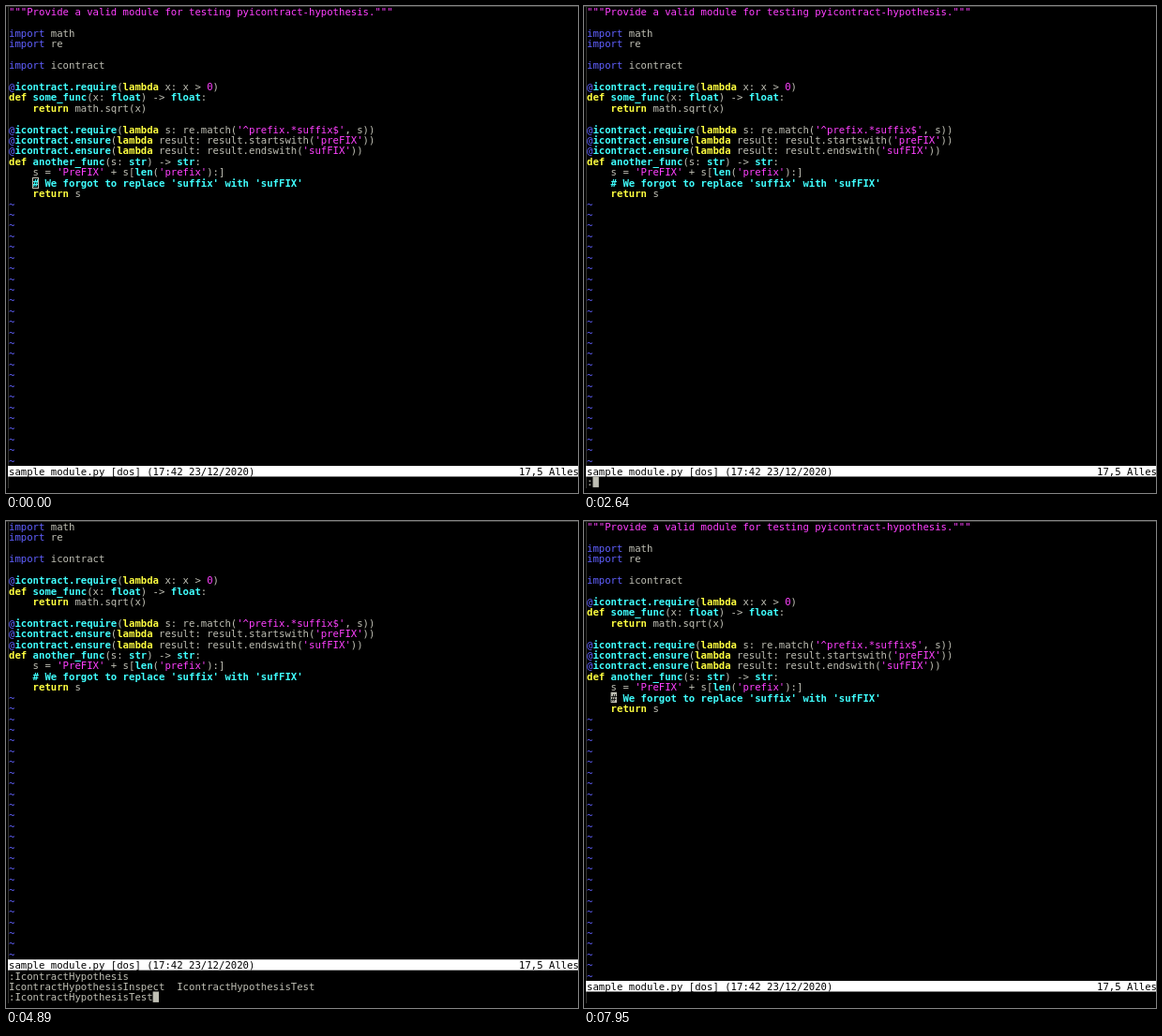
Animation, 610 px wide and 520 px high, one loop 8 s. Source, as an HTML page with a canvas:

```html
<!DOCTYPE html>
<html lang="de">
<head>
<meta charset="utf-8">
<title>Terminal</title>
<style>
html, body { margin: 0; width: 100%; height: 100%; overflow: hidden; background: #000; }
canvas { display: block; }
</style>
</head>
<body>
<canvas id="stage" width="610" height="520"></canvas>
<script>
const ctx = document.getElementById('stage').getContext('2d');
const LOOP = 8000, COLS = 95, ROWS = 45;
const LEFT = 3, CELL_W = 6.4, CELL_H = 11.42, BASE = 10;
const FONT = '10.63px "DejaVu Sans Mono", monospace';
const FG = '#bfbfb4', YELLOW = '#ffff40', CYAN = '#40ffff', BLUE = '#6060ff',
      PINK = '#ff40ff', GREEN = '#40ff40', WHITE = '#ffffff';
const BOLD = new Set([YELLOW, CYAN, GREEN]);

const CODE = `"""Provide a valid module for testing pyicontract-hypothesis."""

import math
import re

import icontract

@icontract.require(lambda x: x > 0)
def some_func(x: float) -> float:
    return math.sqrt(x)

@icontract.require(lambda s: re.match('^prefix.*suffix$', s))
@icontract.ensure(lambda result: result.startswith('preFIX'))
@icontract.ensure(lambda result: result.endswith('sufFIX'))
def another_func(s: str) -> str:
    s = 'PreFIX' + s[len('prefix'):]
    # We forgot to replace 'suffix' with 'sufFIX'
    return s`.split('\n');

const RULES = [
  [PINK, /"""[^"]*"""|'[^']*'|\b0\b/],
  [CYAN, /#.*|(?<=@)[\w.]+|(?<=def )\w+|\b(?:float|str|len)\b/],
  [YELLOW, /\b(?:lambda|def|return)\b/],
  [BLUE, /\bimport\b|@/]
];
const TOKEN = new RegExp(RULES.map(([, re]) => `(${re.source})`).join('|'), 'g');

// A line is a list of [text, colour, column] runs.
const plain = (text, color = FG) => [[text, color, 0]];

function highlight(text) {
  const runs = [];
  let pos = 0;
  for (const m of text.matchAll(TOKEN)) {
    runs.push([text.slice(pos, m.index), FG, pos]);
    const rule = m.slice(1).findIndex(group => group !== undefined);
    runs.push([m[0], RULES[rule][0], m.index]);
    pos = m.index + m[0].length;
  }
  runs.push([text.slice(pos), FG, pos]);
  return runs;
}

const STATUS = 'sample_module.py [dos] (17:42 23/12/2020)'.padEnd(85) + '17,5 Alles';
const EDITOR = CODE.map(highlight);
while (EDITOR.length < 43) EDITOR.push(plain('~', BLUE));
EDITOR.push(plain(STATUS, '#000'));

const HOME = 'belk\\workspace\\tobelka\\icontract-hypothesis';
const PKG = 'icontract_hypothesis\\pyicontract_hypothesis\\';
const LIB = 'venv\\lib\\site-packages\\';
const call = (path, line, name, code, users = 'users') => [
  `  File "C:\\${users}\\${HOME}\\${path}", line ${line}, in ${name}`,
  '    ' + code
];
const execute = call(PKG + '_test.py', 228, 'execute', 'func(**kwargs)');

const OUTPUT = [
  'Falsifying example: execute(',
  "    kwargs={'s': 'prefixsuffix'},",
  ')',
  'Traceback (most recent call last):',
  ...call('venv\\Scripts\\pyicontract-hypothesis-script.py', 11, '<module>',
    "load_entry_point('icontract-hypothesis', 'console_scripts', 'pyicontract-hypothesis')()", 'Users'),
  ...call(PKG + 'main.py', 283, 'entry_point',
    'return run(argv=sys.argv[1:], stdout=sys.stdout, stderr=sys.stderr)'),
  ...call(PKG + 'main.py', 258, 'run', 'errors = _test.test('),
  ...call(PKG + '_test.py', 341, 'test', 'test_errors = _test_function_point('),
  ...call(PKG + '_test.py', 234, '_test_function_point', 'wrapped()'),
  ...execute,
  ...call(LIB + 'hypothesis\\core.py', 1164, 'wrapped_test', 'raise the_error_hypothesis_found'),
  ...execute,
  ...call(LIB + 'icontract\\_checkers.py', 461, 'wrapper',
    '_assert_postcondition(contract=contract, resolved_kwargs=resolved_kwargs)'),
  ...call(LIB + 'icontract\\_checkers.py', 314, '_assert_postcondition', 'raise ViolationError(msg)'),
  `icontract.errors.ViolationError: File C:\\Users\\${HOME}-vim\\sample_module.py, line 14 in <module>:`,
  "result.endswith('sufFIX'):",
  "result was 'PreFIXsuffix'",
  "result.endswith('sufFIX') was False",
  ''
].flatMap(line => line.match(new RegExp(`.{1,${COLS}}`, 'g')) || ['']).map(line => plain(line));

const STEM = ':IcontractHypothesis';
const CHOICES = [plain(STEM), plain('IcontractHypothesisInspect  IcontractHypothesisTest')];
const PROMPT = 'Betätigen Sie die EINGABETASTE oder geben Sie einen Befehl ein';

const FOCUS = 2000, LIST = 4300, ENTER = 5500, RESULT = 6490, RETURN = 7720;
const TYPING = [
  [2500, ':'], [2950, ':I'], [3250, ':Ic'], [3450, ':Ico'], [3650, ':Icon'],
  [3950, STEM], [4500, STEM + 'T'], [4620, STEM + 'Te'], [4760, STEM + 'Test']
];

function fillCell(col, row, cols, color) {
  ctx.fillStyle = color;
  ctx.fillRect(LEFT + col * CELL_W, row * CELL_H, cols * CELL_W, CELL_H);
}

function drawText(text, color, col, row) {
  ctx.fillStyle = color;
  ctx.font = (BOLD.has(color) ? 'bold ' : '') + FONT;
  [...text].forEach((ch, i) => {
    if (ch !== ' ') ctx.fillText(ch, LEFT + (col + i) * CELL_W, row * CELL_H + BASE);
  });
}

// Shows the last screenful, scrolled up as a terminal does.
function drawLines(lines) {
  const skip = lines.length - ROWS;
  lines.slice(skip).forEach((runs, row) => {
    if (row + skip === 43) {
      ctx.fillStyle = WHITE;
      ctx.fillRect(2, row * CELL_H, 608, CELL_H);
    }
    for (const [text, color, col] of runs) drawText(text, color, col, row);
  });
}

function drawEditorCursor(focused) {
  if (focused) {
    fillCell(4, 16, 1, FG);
    drawText('#', '#000', 4, 16);
  } else {
    ctx.strokeStyle = FG;
    ctx.lineWidth = 1;
    ctx.strokeRect(28.5, 183.5, 6, 11);
  }
}

function draw(t) {
  ctx.fillStyle = '#000';
  ctx.fillRect(0, 0, 610, 520);
  ctx.fillStyle = '#333330';
  ctx.fillRect(2, 0, 1, 515);
  ctx.fillRect(0, 0, 610, 1);

  if (t < TYPING[0][0] || t >= RETURN) {
    drawLines([...EDITOR, plain('')]);
    drawEditorCursor(t >= FOCUS);
  } else if (t >= RESULT) {
    drawLines([...EDITOR, ...CHOICES, ...OUTPUT, plain(PROMPT, GREEN)]);
    fillCell(PROMPT.length, 44, 1, FG);
  } else {
    const command = TYPING.filter(([at]) => at <= t).pop()[1];
    drawLines([...EDITOR, ...(t >= LIST ? CHOICES : []), plain(command)]);
    if (t < ENTER) fillCell(command.length, 44, 1, FG);
  }
}

function tick() {
  draw(performance.now() % LOOP);
  requestAnimationFrame(tick);
}
tick();
</script>
</body>
</html>
```
